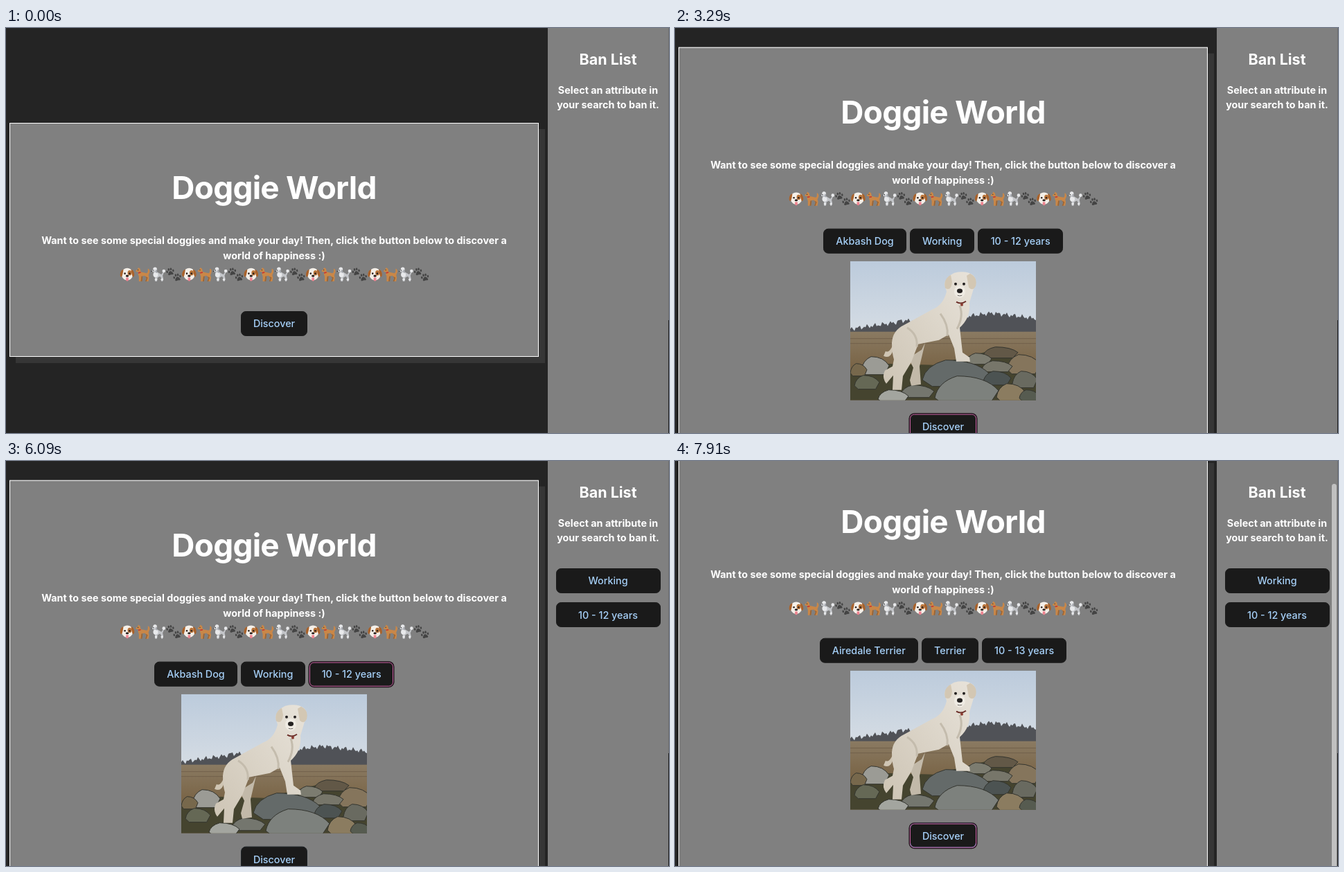
These frames come from a looping animation (957 px wide and 585 px high, 8 s). An HTML page:

```html
<!DOCTYPE html>
<html lang="en">
<head>
<meta charset="utf-8">
<title>Doggie World</title>
<style>
html, body { margin: 0; width: 100%; height: 100%; overflow: hidden; background: #242424; }
body { position: relative; color: #fff; font: 700 14.34px/21.5px Inter, sans-serif; font-optical-sizing: none; text-align: center; }
#panel, #side, #panel > *, #side > *, #thumb, #edge { position: absolute; box-sizing: border-box; }
#panel { left: 5px; top: 0; width: 764px; background: #808080; border: 1px solid #fff; box-shadow: 9px 9px #363636; }
#panel > * { left: -1px; width: 764px; margin: -1px 0 0; }
h1 { top: 64px; font-size: 45.9px; line-height: 60px; letter-spacing: -.016em; }
p { margin: 0; }
#intro { top: 159px; }
#emoji { top: 206.5px; height: 24px; }
#panel #photo { left: 247px; top: 309px; width: 268px; height: 201px; }
.row { display: flex; justify-content: center; gap: 5px; }
#tags { top: 262px; }
.btn { position: relative; box-sizing: border-box; height: 36px; padding: 0 17.2px; display: flex; align-items: center; justify-content: center;
  border: 1px solid #1a1a1a; border-radius: 7.2px; background: #1a1a1a; color: #a6d0f8; font-weight: 500; white-space: nowrap; }
.focus::after { content: ""; position: absolute; inset: -.5px; border: 1.5px solid #c4609f; border-radius: 6.5px; box-shadow: 0 0 0 1.5px #24151f; }
#side { left: 782px; top: 0; width: 174px; height: 585px; background: #808080; }
#side > * { left: 0; width: 174px; margin: 0; }
#side h2 { top: 29.6px; font-size: 21.5px; line-height: 30px; }
#side p { top: 78.6px; }
#side .btn { left: 11.5px; width: 151px; position: absolute; }
#edge { left: 956px; top: 0; width: 1px; height: 585px; background: linear-gradient(#6c6c6c 422px, #1c1c1c 0); }
#thumb { left: 948px; width: 7px; height: 573px; border-radius: 4px; background: #c0c0c0; }
</style>
</head>
<body>
<svg width="0" height="0" style="position:absolute">
  <symbol id="face" viewBox="0 0 24 24">
    <path d="M6 4Q12 0 18 4Q22 10 20 16Q17 21 12 21Q7 21 4 16Q2 10 6 4Z" fill="#f4efe8"/>
    <path d="M6 4Q2 5 1 10Q0 15 3 16Q5 13 6 4M18 4Q22 5 23 10Q24 15 21 16Q19 13 18 4Z" fill="#a9622b"/>
    <ellipse cx="15.8" cy="9.5" rx="3.2" ry="4" fill="#b8743a"/>
    <path d="M10 17h4v4q-2 3-4 0Z" fill="#ee8390"/>
    <g fill="#2b211d"><circle cx="8.3" cy="10.5" r="1.4"/><circle cx="15.7" cy="10.5" r="1.4"/><ellipse cx="12" cy="14.3" rx="2.4" ry="1.7"/></g>
  </symbol>
  <symbol id="dog" viewBox="0 0 24 24">
    <path d="M1 6L4 4L5 1L8 3L9 8L18 10Q21 9 20 3Q23 3 23 8Q22 11 21 13L22 17L21 23H18L18 17L15 14L10 15L9 23H6L6 15Q4 12 5 8L2 8Z" fill="#c98748"/>
    <path d="M10 15L9 23H11L12 15M16 15L18 18L16 23H18L20 17Z" fill="#a0642f"/>
    <path d="M5 8.5L9 8V9.5L5 10.5Z" fill="#c8342f"/><circle cx="4.6" cy="5" r=".7" fill="#222"/>
  </symbol>
  <symbol id="poodle" viewBox="0 0 24 24">
    <path d="M1 7L4 5Q4 1 7 1Q10 2 10 8L17 12L20 8L21 9L19 14L20 18L19 23H17V18L15 15L11 17L10 23H7L7 17Q3 14 5 8L2 8Z" fill="#c3c5c9"/>
    <g fill="#e8e9eb"><circle cx="7" cy="3.6" r="3"/><circle cx="8" cy="12.5" r="3.8"/><circle cx="20.8" cy="6.5" r="2.5"/><circle cx="8.5" cy="20" r="1.9"/><circle cx="18" cy="20" r="1.9"/></g>
    <path d="M8 4Q11 5 10 10Q7 9 8 4" fill="#a5a8ae"/><circle cx="4.8" cy="5.4" r=".7" fill="#222"/><circle cx="1.6" cy="7" r=".8" fill="#222"/>
  </symbol>
  <symbol id="paw" viewBox="0 0 12 12">
    <path d="M6 5.3Q8 5.5 9.8 9Q10 11.5 7.5 10.8Q6 10.4 4.5 10.8Q2 11.5 2.2 9Q4 5.5 6 5.3Z"/>
    <ellipse cx="1.5" cy="5.5" rx="1.3" ry="1.8"/><ellipse cx="4.4" cy="2.7" rx="1.3" ry="1.9"/><ellipse cx="7.6" cy="2.7" rx="1.3" ry="1.9"/><ellipse cx="10.5" cy="5.5" rx="1.3" ry="1.8"/>
  </symbol>
  <symbol id="paws" viewBox="0 0 24 24">
    <g fill="#444"><use href="#paw" width="13" height="13" transform="translate(0 1) rotate(-12 6 6)"/><use href="#paw" width="13" height="13" transform="translate(11 10) rotate(-12 6 6)"/></g>
  </symbol>
</svg>

<div id="panel">
  <h1>Doggie World</h1>
  <p id="intro">Want to see some special doggies and make your day! Then, click the button below to discover a<br>world of happiness :)</p>
  <svg id="emoji"></svg>
  <div id="tags" class="row"><div class="btn"></div><div class="btn"></div><div class="btn"></div></div>
  <svg id="photo" viewBox="0 0 268 201">
    <defs>
      <linearGradient id="sky" x2="0" y2="1"><stop stop-color="#bccbdc"/><stop offset="1" stop-color="#d6dde4"/></linearGradient>
      <linearGradient id="field" x2="0" y2="1"><stop stop-color="#8a7a62"/><stop offset=".5" stop-color="#7a6547"/></linearGradient>
      <linearGradient id="fur" x1="1" x2="0" y2="1"><stop stop-color="#e8e3da"/><stop offset="1" stop-color="#cdc4b4"/></linearGradient>
    </defs>
    <rect width="268" height="108" fill="url(#sky)"/>
    <path id="trees" fill="#505257"/>
    <rect y="102" width="268" height="99" fill="url(#field)"/>
    <path d="M0 112H268M0 119H268" stroke="#6c5b47" stroke-width=".8"/>
    <path d="M0 160L50 148L120 150L200 130L268 145V201H0Z" fill="#45442f"/>
    <g id="rocks" stroke="#33342e" stroke-width="1"></g>
    <path d="M62 128Q58 142 48 137L51 130Q56 134 62 120Z" fill="#cfc5b3"/>
    <path d="M84 140L103 128L108 118L100 152L102 178L88 180L86 172L91 154Z" fill="#c2b9a9"/>
    <path d="M139 44Q134 64 118 70L78 92Q61 100 60 118Q60 132 63 142L61 152L50 158Q45 168 52 177L62 165L61 186L74 186L76 166L88 146L98 120L128 114L142 106L150 126L153 145L173 145L172 139L162 132L158 96Q174 82 172 60L178 40Q184 28 178 21Q168 13 150 17Q137 23 136 34Z" fill="url(#fur)"/>
    <path d="M145 20Q134 26 137 39Q146 44 147 30ZM173 18Q184 23 181 36Q177 44 171 38L168 21Z" fill="#d3c7b3"/>
    <path d="M130 76Q142 92 140 108M82 96Q98 106 96 124M158 64Q164 80 154 98" fill="none" stroke="#c4bcad" stroke-width="3"/>
    <ellipse cx="158" cy="44" rx="8" ry="9" fill="#efebe3"/>
    <path d="M153 59Q160 63 167 58" fill="none" stroke="#6c302a" stroke-width="2"/><circle cx="161" cy="63" r="2" fill="#8b3c31"/>
    <g fill="#242120"><circle cx="152" cy="33" r="2"/><circle cx="164" cy="33" r="2"/><ellipse cx="158" cy="43" rx="4" ry="3.3"/><path d="M154 49Q158 52 162 49L158 50Z"/></g>
  </svg>
  <div id="go" class="row"><div class="btn">Discover</div></div>
</div>

<div id="side">
  <h2>Ban List</h2>
  <p>Select an attribute in<br>your search to ban it.</p>
  <div class="btn" style="top:154.6px">Working</div>
  <div class="btn" style="top:204.4px">10 - 12 years</div>
</div>
<div id="edge"></div>
<div id="thumb"></div>

<script>
const $ = id => document.getElementById(id);
const panel = $('panel'), tagRow = $('tags'), tags = [...tagRow.children];
const discover = $('go').firstElementChild;
const bans = document.querySelectorAll('#side .btn');

$('emoji').innerHTML = Array.from({ length: 20 }, (_, i) =>
  `<use href="#${['face', 'dog', 'poodle', 'paws'][i % 4]}" x="${159 + i * 22.35}" y="1" width="22" height="22"/>`).join('');

let treeline = 'M0 104';
for (let x = 0; x <= 268; x += 2) {
  const height = x < 70 ? 6 + x / 7 : x < 150 ? 18 : 29 - Math.abs(x - 205) / 8;
  treeline += `L${x} ${104 - height + 4 * Math.sin(x * 2.3) * Math.sin(x * 0.31)}`;
}
$('trees').setAttribute('d', treeline + 'V104Z');

// centre x, centre y, half width, half height, colour
const rocks = [
  [36, 151, 20, 13, '#9b9b95'], [12, 157, 12, 9, '#77684c'], [24, 175, 18, 10, '#656855'],
  [217, 132, 25, 8, '#625847'], [186, 141, 18, 8, '#7c7c70'], [250, 149, 24, 14, '#85755c'],
  [212, 152, 22, 8, '#77766a'], [252, 171, 18, 12, '#696a60'], [152, 162, 48, 19, '#646a69'],
  [212, 169, 20, 10, '#4c5352'], [97, 188, 24, 9, '#74766e'], [62, 195, 22, 9, '#a3a59f'],
  [232, 190, 21, 13, '#8b7c60'], [168, 187, 46, 21, '#7d817d'], [258, 194, 14, 8, '#565b50'],
];
$('rocks').innerHTML = rocks.map(([x, y, w, h, fill]) =>
  `<path d="M${x - w} ${y + h * .5}Q${x - w * .9} ${y - h * .6} ${x - w * .3} ${y - h}Q${x + w * .6} ${y - h} ${x + w} ${y}L${x + w * .7} ${y + h}H${x - w * .7}Z" fill="${fill}"/>`).join('');

const clamp = v => Math.max(0, Math.min(1, v));
const smooth = v => (v = clamp(v), v * v * (3 - 2 * v));
const hover = (t, on, off) => smooth((t - on) / 250) * (1 - smooth((t - off) / 250));
const between = (t, a, b) => t >= a && t < b;

function style(button, glow, focused) {
  const mix = (a, b) => a + (b - a) * glow;
  button.style.borderColor = `rgb(${mix(26, 91)},${mix(26, 155)},${mix(26, 216)})`;
  button.classList.toggle('focus', focused);
}
const show = (el, on) => el.style.visibility = on ? 'visible' : 'hidden';

function draw(t) {
  const found = t >= 2940, loaded = t >= 3220;
  const scroll = 34 * smooth((t - 7070) / 590);
  const [top, height, buttonTop] = loaded ? [27.7, 595, 529.3] : found ? [100.5, 411, 345] : [137, 338, 272];
  panel.style.transform = `translateY(${top - scroll}px)`;
  panel.style.height = height + 'px';
  $('go').style.top = buttonTop + 'px';

  const labels = t < 7840 ? ['Akbash Dog', 'Working', '10 - 12 years'] : ['Airedale Terrier', 'Terrier', '10 - 13 years'];
  tags.forEach((tag, i) => tag.textContent = labels[i]);
  show(tagRow, found);
  show($('photo'), loaded);

  style(tags[1], hover(t, 4040, 4830), between(t, 4340, 5180));
  style(tags[2], hover(t, 5020, 5500), between(t, 5180, 6650));
  style(discover, hover(t, 670, 1590) + hover(t, 6050, 9000), between(t, 1190, 4340) || t >= 6650);

  show(bans[0], t >= 4410);
  show(bans[1], t >= 5250);
  show($('thumb'), t >= 7140);
  $('thumb').style.top = scroll * .97 + 'px';
}

function tick() {
  const t = performance.now() % 8000;
  draw(Math.floor(t / 70) * 70);
  requestAnimationFrame(tick);
}
tick();
</script>
</body>
</html>
```
